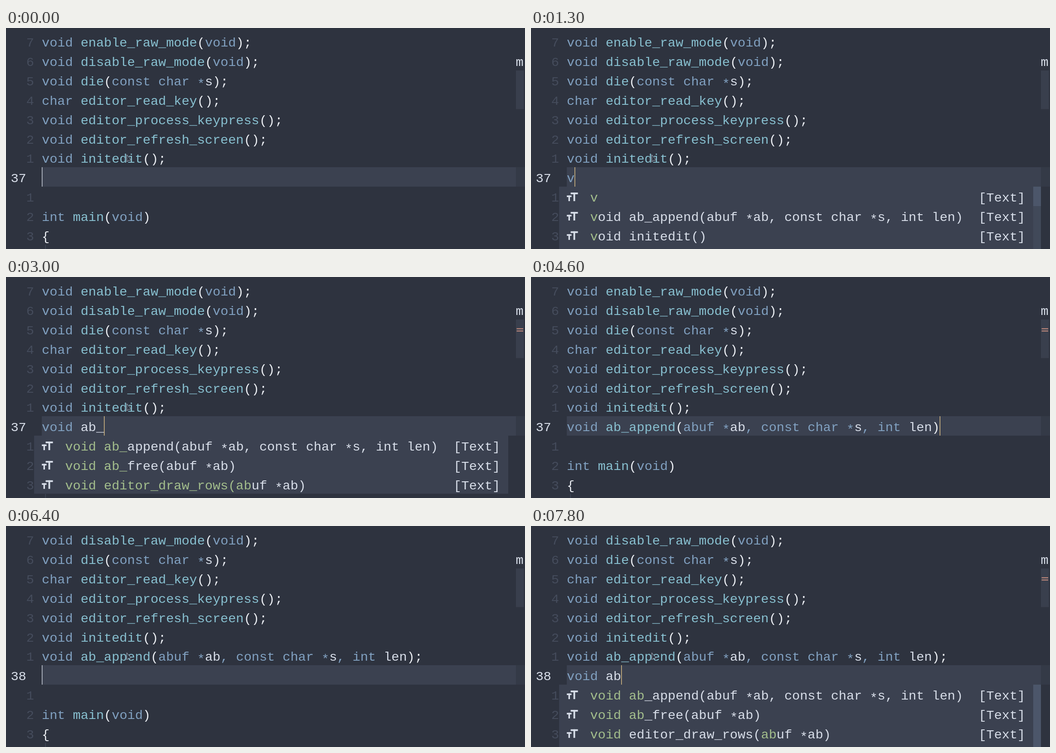
Write an HTML page with a canvas that moves like this. It is 1145 by 489 pixels and loops after 8000 ms.

```html
<!DOCTYPE html>
<html lang="en">
<head>
<meta charset="utf-8">
<title>Code completion</title>
<style>
html, body { margin: 0; width: 100%; height: 100%; overflow: hidden; background: #2e333f; }
canvas { display: block; width: 1145px; height: 489px; }
</style>
</head>
<body>
<canvas id="stage"></canvas>
<script>
const W = 1145, H = 489, LOOP = 8000;
const LEFT = 79, CELL = 17.14, ROW = 42.86, TOP = 8.2, BASE = 33;
const FONT = '28.56px "Liberation Mono", "Courier New", monospace';
const C = {
  bg: '#2e333f', line: '#3b4150', edge: '#343a47', track: '#414959', thumb: '#4c566a',
  num: '#454c5c', text: '#d8dee9', punct: '#eceff4', key: '#81a1c1', func: '#88c0d0',
  match: '#a3be8c', caret: '#ebcb8b', mark: '#cc8f80'
};

const HEADERS = [
  'void enable_raw_mode(void);',
  'void disable_raw_mode(void);',
  'void die(const char *s);',
  'char editor_read_key();',
  'void editor_process_keypress();',
  'void editor_refresh_screen();',
  'void initedit();'
];
const BELOW = ['', 'int main(void)', '{'];
const APPEND = 'void ab_append(abuf *ab, const char *s, int len)';
const FREE = 'void ab_free(abuf *ab)';
const DRAW = 'void editor_draw_rows(abuf *ab)';
const INIT = 'void initedit()';

// time, typed text, diagnostic bars, lines already finished
const STEPS = [
  [0, '', 0, 0],
  [1300, 'v', 0, 0],
  [1400, 'vo', 1, 0],
  [1500, 'vo', 3, 0],
  [1600, 'voi', 3, 0],
  [1900, 'void', 1, 0],
  [2000, 'void ', 1, 0],
  [2200, 'void a', 2, 0],
  [2400, 'void ab', 2, 0],
  [2700, 'void ab_', 2, 0],
  [4600, APPEND, 2, 0],
  [4700, APPEND, 1, 0],
  [5800, APPEND + ';', 0, 0],
  [6100, '', 0, 1],
  [6900, 'v', 1, 1],
  [7000, 'vo', 1, 1],
  [7100, 'voi', 1, 1],
  [7200, 'void', 1, 1],
  [7300, 'void ', 1, 1],
  [7500, 'void a', 2, 1],
  [7700, 'void ab', 2, 1]
];

const canvas = document.getElementById('stage');
const ctx = canvas.getContext('2d');
const ratio = window.devicePixelRatio || 1;
canvas.width = W * ratio;
canvas.height = H * ratio;
ctx.scale(ratio, ratio);

const rowY = row => TOP + row * ROW;

function rect(x, y, w, h, color) {
  ctx.fillStyle = color;
  ctx.fillRect(x, y, w, h);
}

// Asterisks sit at mid-height, lower than the font places them
function write(str, col, row, color) {
  ctx.fillStyle = color;
  for (const m of str.matchAll(/\*|[^*]+/g)) {
    const drop = m[0] === '*' ? 5 : 0;
    ctx.fillText(m[0], LEFT + (col + m.index) * CELL, rowY(row) + BASE + drop);
  }
}

function tokenColor(token, rest) {
  if (/^(void?|voi?|v|int|char|const|abuf|[*,])$/.test(token)) return C.key;
  if (/^\w/.test(token)) return rest[0] === '(' ? C.func : C.text;
  return C.punct;
}

function code(str, row) {
  for (const m of str.matchAll(/\w+|[^\w\s]/g)) {
    write(m[0], m.index, row, tokenColor(m[0], str.slice(m.index + m[0].length)));
  }
}

function icon(row) {
  const y = rowY(row) + 13;
  rect(87.5, y, 16, 3.8, C.text);
  rect(93.6, y, 3.8, 19, C.text);
  rect(79, y + 6.5, 10.5, 3.5, C.text);
  rect(82.5, y + 6.5, 3.5, 12.5, C.text);
}

function suggestions(typed) {
  if (typed === 'v') return [typed, APPEND, INIT];
  if (typed.length < 6) return [APPEND, INIT, 'void die(const char *s)'];
  return [APPEND, FREE, DRAW];
}

// Ranges of a suggestion that match the typed text
function matches(item, typed) {
  if (item.startsWith(typed)) return [[0, typed.length]];
  const open = item.indexOf('(') + 1;
  return typed.endsWith('_') ? [[0, open + 2]] : [[0, 5], [open, open + typed.length - 5]];
}

function popup(typed) {
  const top = 351, last = typed.endsWith('_');
  rect(62, top, 1046, last ? 128.5 : H - top, C.line);
  if (!last) {
    const thumb = typed.length < 2 ? 43 : typed.length < 6 ? 56 : typed.length < 7 ? 100 : H - top;
    rect(1108, top, 17, H - top, C.track);
    rect(1108, top, 17, thumb, C.thumb);
  }
  suggestions(typed).forEach((item, i) => {
    const row = 8 + i;
    icon(row);
    let at = 0;
    for (const [from, to] of matches(item, typed)) {
      write(item.slice(at, from), 3 + at, row, C.text);
      write(item.slice(from, to), 3 + from, row, C.match);
      at = to;
    }
    write(item.slice(at), 3 + at, row, C.text);
    write('[Text]', 53, row, C.text);
  });
}

function sidebar(bars) {
  write('m', 61, 1, C.text);
  rect(1125, 94, 17.5, 85.5, '#393f4d');
  const gap = bars === 3 ? 7 : 5;
  for (let i = 0; i < bars; i++) {
    rect(1126.5, 116 + (i - (bars - 1) / 2) * gap, 14.5, 2, C.mark);
  }
}

function pointer() {
  ctx.beginPath();
  ctx.moveTo(266.5, 280.5);
  ctx.lineTo(266.5, 296);
  ctx.lineTo(270, 293);
  ctx.lineTo(276, 292);
  ctx.closePath();
  ctx.fillStyle = C.bg;
  ctx.fill();
  ctx.strokeStyle = '#aab4c4';
  ctx.lineWidth = 1;
  ctx.stroke();
}

function draw([, typed, bars, done]) {
  ctx.font = FONT;
  ctx.textBaseline = 'alphabetic';
  rect(0, 0, W, H, C.bg);
  rect(79, 308, 1046, 43, C.line);
  rect(1125, 308, 20, 43, C.edge);

  const above = done ? [...HEADERS.slice(1), APPEND + ';'] : HEADERS;
  above.forEach((str, i) => {
    write(String(7 - i), -2, i, C.num);
    code(str, i);
  });
  write(String(37 + done), -4, 7, C.text);
  code(typed, 7);
  BELOW.forEach((str, i) => {
    write(String(i + 1), -2, 8 + i, C.num);
    code(str, 8 + i);
  });
  rect(86.5, 480, 1.2, 9, '#484f5f');

  sidebar(bars);
  if (typed && typed.length < 9) popup(typed);
  rect(79 + typed.length * CELL, 308, 1.3, 43, typed ? C.caret : C.text);
  pointer();
}

const start = performance.now();
let shown = null;
function tick() {
  const t = (performance.now() - start) % LOOP;
  const step = STEPS.findLast(s => s[0] <= t) || STEPS[0];
  if (step !== shown) draw(shown = step);
  requestAnimationFrame(tick);
}
tick();
</script>
</body>
</html>
```
